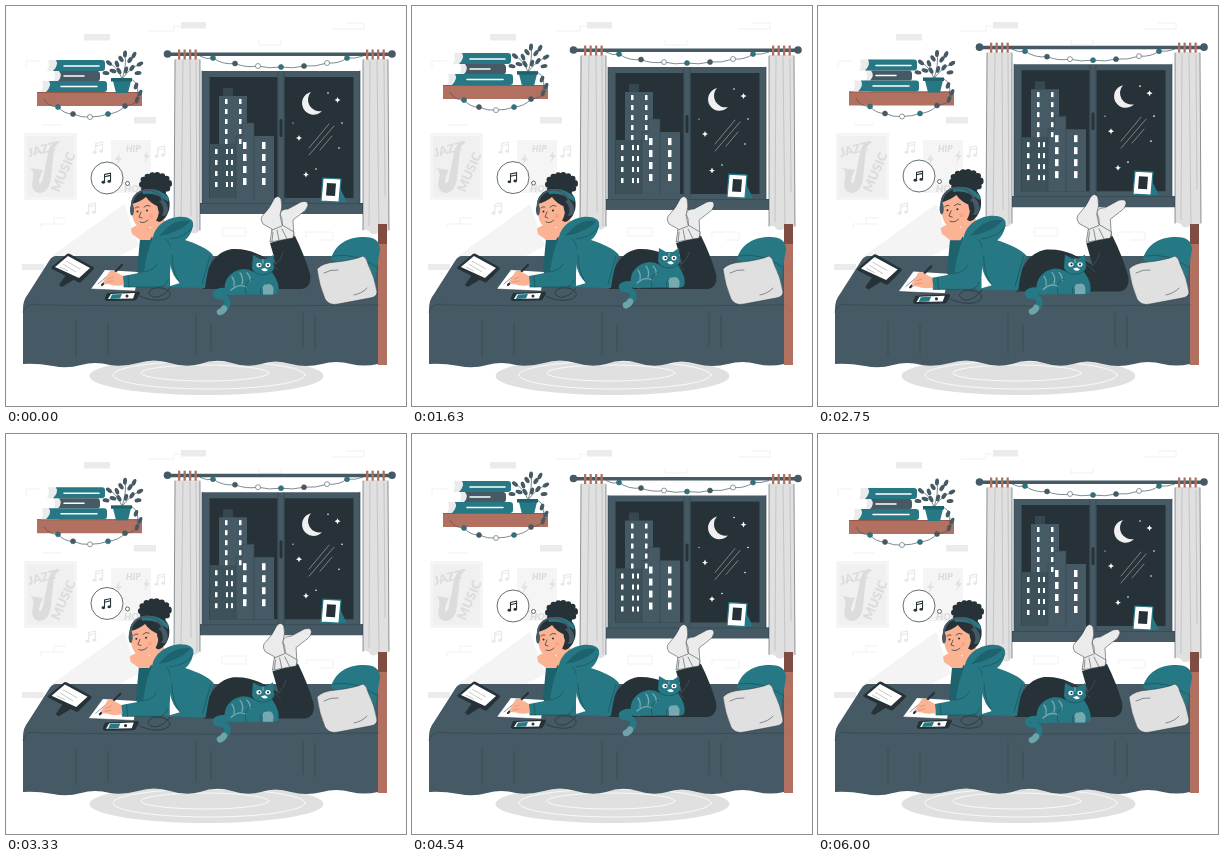
Animation, 400 px wide and 400 px high, one loop 6.04 s. Source, as an HTML page:

```html
<!DOCTYPE html>
<html lang="en">
<head>
<meta charset="utf-8">
<title>Evening with music</title>
<style>
  html, body { margin: 0; width: 100%; height: 100%; overflow: hidden; background: #fff; }
  svg { display: block; width: 100vw; height: 100vh; }
  text { font-family: Lato, sans-serif; font-weight: 900; fill: #dcdcdc; }
  .slate { fill: #455a64; } .dark { fill: #263238; } .teal { fill: #267884; }
  .deep { fill: #1d626d; } .brown { fill: #b27060; } .skin { fill: #fcb394; }
  .white { fill: #fff; } .grey { fill: #e0e0e0; } .pale { fill: #ebebeb; }
  .line { fill: none; stroke: #263238; stroke-width: .7; stroke-linecap: round; stroke-linejoin: round; }
  .soft { stroke: #164d56; stroke-width: .6; }
  .wire { fill: none; stroke: #455a64; stroke-width: .7; }
  .thin { fill: none; stroke: #fff; stroke-width: .8; stroke-linecap: round; }
  .faint { fill: none; stroke: #eee; stroke-width: .8; }
</style>
</head>
<body>
<svg viewBox="0 0 400 400">
  <defs>
    <g id="notes">
      <ellipse cx="-3.500" cy="4.200" rx="2" ry="1.600"/><ellipse cx="3" cy="3.200" rx="2" ry="1.600"/>
      <path d="M-2.200 4V-4.500L4.500-6V3M-2.200-2L4.500-3.500" fill="none" stroke="currentColor" stroke-width="1.200"/>
    </g>
    <path id="star" d="M0-3Q.3-.3 3 0Q.3 .3 0 3Q-.3 .3-3 0Q-.3-.3 0-3"/>
    <path id="bolt" d="M2-6L-3 1H0L-2 7L4-1H1Z"/>
  </defs>

  <!-- wall -->
  <path class="pale" d="M78 28h26v6.500h-26zM175 16h25v6.500h-25zM128 111h22v6.500h-22zM16 258h22v6h-22z"/>
  <path class="faint" d="M143 25h25v-5h9M326 23h32M340 17h18v6M253 34v5h22v-5M20 62v-7h15M35 222v-4h24M48 218v-6h12M216 230v-8h24v8zM300 231v-5h25M313 234h14v-8M110 50h18M36 119h20"/>
  <path d="M18 127h53v67h-53z" fill="#f5f5f5"/>
  <path d="M21 130h47v61h-47z" fill="#f0f0f0"/>
  <path d="M46 138Q50 133 54 136Q49 139 48 144L45 172Q43 187 33 187Q24 185 27 173Q29 165 24 162L37 164Q33 171 33 177Q36 178 37 172L42 147Q43 141 46 138Z" fill="#dcdcdc"/>
  <text transform="translate(23 151) rotate(-14)" font-size="12">JAZZ</text>
  <text transform="translate(53 187) rotate(-66)" font-size="13">MUSIC</text>
  <path d="M105 134h40v53h-40z" fill="#f5f5f5"/>
  <g style="fill:#e2e2e2">
    <text x="120" y="146" font-size="9" font-style="italic">HIP</text>
    <text x="118" y="186" font-size="10" font-style="italic">HOP</text>
    <use href="#bolt" x="112" y="153"/><use href="#bolt" x="140" y="150"/>
  </g>
  <g fill="#e8e8e8" color="#e8e8e8">
    <use href="#notes" x="92" y="142"/><use href="#notes" x="85" y="203"/><use href="#notes" x="154" y="146"/>
  </g>
  <path d="M46 250L118 198L133 240L88 263Z" fill="#f4f4f4"/>

  <g id="bubble">
    <g class="white" stroke="#263238" stroke-width=".7">
      <circle cx="101" cy="172" r="16"/><circle cx="121.500" cy="177.500" r="2"/>
    </g>
    <g class="dark" color="#263238"><use href="#notes" transform="translate(100.500 172.500) scale(.9)"/></g>
  </g>

  <g id="shelf">
    <path class="brown" d="M31 86h105v14h-105z"/>
    <path d="M31 86h105v1h-105z" fill="#95594a"/>
    <path class="pale" d="M36 75h17v11h-18q3-5 1-11zM48 65h14v10h-14q2-5 0-10zM42 54h15v11h-16q3-5 1-11z"/>
    <path class="teal" d="M43 75H98Q101 75 101 78V83Q101 86 98 86H40Q46 80 43 75M50 54H96Q99 54 99 57V62Q99 65 96 65H47Q53 59 50 54"/>
    <path class="slate" d="M53 65H92Q94 66 94 68V72Q94 75 92 75H52Q57 70 53 65"/>
    <path class="thin" d="M55 80.500h36M58 60h35M58 70h20" style="stroke-width:1.500"/>
    <path class="line" d="M116 73Q112 61 103 57M116 73Q121 59 119 48M116 73Q124 62 134 58M121 73Q133 71 132 91" style="stroke:#455a64"/>
    <g class="slate" id="leaves"></g>
    <path class="teal" d="M107 75H125L122 87H110Z"/><path class="deep" d="M105 72h21v3.500h-21z"/>
    <path class="wire" d="M38 93Q42 101 52 101Q58 108 67 108Q76 112 84 111Q94 111 102 108Q113 107 119 100Q130 99 134 91"/>
    <g id="shelfLights"></g>
  </g>

  <g id="window">
    <path class="slate" d="M196 65h158v132h-158zM193 197h164v11h-164z"/>
    <path class="line" d="M193 197.500h164M196 65v132M354 65v132" style="stroke:#37474f"/>
    <path class="dark" d="M203.500 71h68v121h-68zM278.500 71h69v121h-69z"/>
    <path d="M217 82h10v8h-10zM204 138h26v54h-26z" fill="#37474f"/>
    <path class="slate" d="M213 90h28v102h-28zM230 130h6v-13h12v13h20v62h-38z"/>
    <path d="M204 138h26v54h-26z" fill="#3d515b"/>
    <path d="M230 192V130h6V117h12v13V192" class="line" style="stroke:#37474f"/>
    <g class="white" id="panes"></g>
    <path class="line" d="M272 66v130M278 66v130" style="stroke:#37474f"/>
    <rect class="dark" x="273.500" y="113" width="3" height="18" rx="1.500"/>
    <path d="M305 86A11.500 11.500 0 1 0 316 105A11.500 11.500 0 0 1 305 86" fill="#f0f0f0"/>
    <g class="white">
      <use href="#star" x="331.500" y="94"/><use href="#star" x="293" y="132"/><use href="#star" x="300" y="168.500"/>
      <circle cx="322" cy="87" r=".8"/><circle cx="336" cy="117" r=".8"/><circle cx="310" cy="163" r=".8"/><circle cx="333" cy="142" r=".8"/><circle cx="287" cy="117" r=".6"/>
    </g>
    <path d="M303 142L323 118M303 149L328 120M314 144L326 130" class="thin" stroke-opacity=".65" style="stroke-width:.6"/>
    <path class="teal" d="M333 180L341 196H331Z"/>
    <path class="white" stroke="#267884" stroke-width="1.200" d="M317 172L335 173L333 196L315 195Z"/>
    <path class="dark" d="M321 177L330 177.500L329 190L320 189.500Z"/>
    <path class="grey" d="M169 53H194V224Q189 230 185 226Q179 222 176 226Q171 229 168 225Z"/>
    <path class="grey" d="M357 53H382L383 224Q378 230 373 226Q366 231 363 225Q359 223 357 224Z"/>
    <path class="line" d="M177 55L175 220M184 55L185 210M190 55L191 224M364 55L363 220M371 55L373 225M378 56L379 190" style="stroke:#a8a8a8;stroke-width:.5"/>
    <path class="line" d="M169 54L168 225M194 54V224M357 54V224M382 54L383 224" style="stroke-width:.5"/>
    <path class="slate" d="M162 46.500h225v3.500h-225z"/>
    <circle class="slate" cx="161.500" cy="48" r="3.800"/><circle class="slate" cx="386" cy="48" r="3.800"/>
    <g class="brown" id="rings"></g>
    <path class="wire" d="M194 50Q201 54 207 52Q217 59 229 57.500Q240 62 252 60Q263 63 275 61Q287 63 298 60Q310 61 321 57Q333 58 341 52Q349 53 357 50"/>
    <g id="windowLights"></g>
  </g>

  <!-- rug and bed -->
  <ellipse class="grey" cx="200.500" cy="370" rx="117" ry="19"/>
  <ellipse class="thin" cx="203" cy="369" rx="96" ry="14"/><ellipse class="thin" cx="199" cy="367" rx="64" ry="8"/>
  <path class="brown" d="M372 218h9v141h-9z"/><path d="M372 218h9v20h-9z" fill="#7f4d42"/>
  <path class="slate" d="M50 250H372V358Q358 361 345 358Q330 354 316 358Q300 362 285 358Q269 353 255 358Q241 362 226 357Q210 352 194 358Q180 362 164 357Q148 352 132 357Q117 361 104 359Q89 355 75 359Q61 363 47 360Q30 357 17 358V303Q17 294 22 288L43 255Q46 250 50 250Z"/>
  <path class="line" d="M34 299Q200 301 372 299M70 315V350M102 318V348M190 308V348M205 318V345M297 307V340M309 309V343M17 306Q20 295 34 299" style="stroke:#37474f"/>
  <path class="teal" d="M325 253C329 238 342 231 358 231C369 231 374 235 374 244Q371 259 369 275L342 270Z"/>
  <path class="line soft" d="M327 250Q350 246 372 262"/>
  <path class="grey" stroke="#263238" stroke-width=".5" d="M311 263Q316 257 330 256Q348 254 357 250Q361 252 362 258Q369 272 371 286Q371 291 364 292Q348 295 332 298Q323 300 319 293Q313 279 311 263Z"/>
  <path class="line" d="M318 267Q325 263 332 264M361 282Q357 287 348 289" style="stroke-width:.5"/>

  <g id="girl">
    <!-- tablet, notebook, phone -->
    <path class="dark" d="M62 266L53 279L56 281L69 273L82 270L76 262Z"/>
    <path class="dark" d="M45 261.500L61 248Q62 247 64 248L87 261Q89 262 87 264L75 276Q74 277 72 276L46 263Z"/>
    <path class="white" d="M49 261L62 250L84 262L73 272Z"/>
    <path d="M60 255L74 263M57 258L70 266M54 261L62 265" stroke="#bbb" stroke-width=".8" fill="none"/>
    <path class="white" d="M85 283L99 264L132 266L129 285Z"/><path class="line" d="M85 283L129 285M92 278L106 266" style="stroke-width:.5"/>
    <path class="line" d="M134 290C147 297 166 295 164 287C161 280 143 280 143 287C146 294 157 292 164 282"/>
    <path class="dark" d="M101 287L133 285.500Q135 287 133 289L131 293Q130 294.500 128 294.500L101 295Q98 294 99 292Z"/>
    <path class="white" d="M105 288L129 287L127 292.500L102 293Z"/><path class="teal" d="M106 288.500L116 288L114 292.500L104 293Z"/><circle class="dark" cx="121" cy="290" r="1.500"/>

    <!-- legs -->
    <path class="pale" stroke="#263238" stroke-width=".5" d="M277 228L276 213L274 208Q275 203 282 203L295 196Q302 194 302 199Q301 204 296 207L287 214L288 231"/>
    <path class="dark" d="M264 237L289 230Q298 248 304 268Q306 281 296 283L197 283C200 262 208 246 226 243C244 242 255 249 270 258Z"/>
    <path class="pale" stroke="#263238" stroke-width=".5" d="M264 236L266 223L257 218Q253 212 258 208Q264 202 268 193Q272 188 275 193Q277 201 274 209L276 219L288 226L287 232Z"/>
    <path class="line" d="M266 224L276 220M267 226L266 235M271 224L273 234M276 223L281 233" style="stroke-width:.5"/>
    <path class="line" d="M269 259Q275 254 277 246M272 264Q262 254 249 249" style="stroke:#506570;stroke-width:.5"/>

    <!-- body -->
    <path class="deep" d="M134 233L148 230L153 268L131 266Z"/>
    <path class="skin" d="M125 223Q130 218 139 219L149 225L144 234L134 234Q129 230 126 228Z"/>
    <path class="skin" d="M143 214L155 208L163 223L147 234Z"/>
    <path class="teal" d="M147 231C149 221 158 213 171 211C181 210 188 213 187 219C186 226 183 231 179 234C191 238 201 242 207 249Q202 260 199 282L160 281L141 267Q139 250 147 231Z"/>
    <path class="white" d="M164 257Q166 270 174 277L164 280Z"/>
    <path class="deep" d="M162 221Q172 213 184 215Q180 221 170 225Q162 229 153 230Z"/>
    <path class="line soft" d="M160 233Q165 236 164 244M187 220Q181 231 164 233M166 249Q166 266 174 277M196 278L204 250"/>
    <path class="teal" d="M148 230Q158 231 164 240Q167 257 162 275Q160 281 151 281L118 281Q115 276 117 270L138 266Q140 247 148 230Z"/>
    <path class="line soft" d="M138 266Q149 264 151 258M118 281L151 281Q159 282 162 274M122 270L123 281"/>
    <path d="M96 279L116 259" stroke="#263238" stroke-width="2.200" stroke-linecap="round"/>
    <path class="skin" d="M117 270L108 265Q104 263 102 268L97 276Q98 279 102 278Q109 281 118 279Z"/>
    <path class="line" d="M102 273L107 271M101 276L107 275" style="stroke:#c67b65;stroke-width:.5"/>

    <!-- head -->
    <ellipse class="dark" cx="149.500" cy="178" rx="14" ry="9"/>
    <ellipse cx="149.500" cy="178" rx="13.500" ry="9" fill="none" stroke="#263238" stroke-width="6" stroke-linecap="round" stroke-dasharray="0 5"/>
    <path class="dark" d="M125 202C124 191 131 184 143 182C158 181 166 190 163 204Q160 214 153 216Z"/>
    <path class="skin" d="M126 198C125 211 128 221 137 223C147 223 154 212 153 201Q144 197 140 191Q134 196 126 198Z"/>
    <path class="teal" d="M136 184Q152 180 163 192L162 196Q151 186 137 188Z"/>
    <path class="line" d="M129 202Q131 200 133 201M138 201Q141 198 144 200M135 206L133 211L136 212M134 216Q138 218 142 214"/>
    <circle class="dark" cx="131.500" cy="205.500" r="1"/><circle class="dark" cx="141" cy="204.500" r="1"/>
    <circle cx="145" cy="210" r="2.200" fill="#f08975" fill-opacity=".35"/>
    <path d="M126 201C124 182 153 176 158 198" fill="none" stroke="#455a64" stroke-width="2"/>
    <ellipse class="slate" cx="126" cy="204" rx="2" ry="5.500"/>
    <ellipse class="slate" cx="157" cy="202" rx="5" ry="8" transform="rotate(-12 157 202)"/>
    <ellipse class="dark" cx="154.500" cy="202.500" rx="2.600" ry="6.500" transform="rotate(-12 154.500 202.500)"/>
  </g>

  <g id="cat">
    <path d="M227 286C211 283 207 288 212 290C222 290 226 299 214 306" fill="none" stroke="#267884" stroke-width="6.500" stroke-linecap="round"/>
    <path d="M218 302.500Q217 305 214 306" fill="none" stroke="#6fa3aa" stroke-width="6.500" stroke-linecap="round"/>
    <path class="teal" d="M219 286C217 273 225 265 237 263Q243 263 248 266L266 266Q275 279 272 287Q268 290 254 288.500L222 289Z"/>
    <path class="teal" d="M246 262L247 249L254 253L261 253L267 249L268 262C267 270 248 271 246 262Z"/>
    <path d="M257 284Q254 278 264 278Q269 280 267 288.500H257Z" fill="#78a9b0"/>
    <path d="M226 271Q229 275 228 280M234 267Q238 272 236 278M241 267Q245 271 244 275M225 284Q233 277 240 281M257 254V257" fill="none" stroke="#78a9b0" stroke-width="1.300" stroke-linecap="round"/>
    <path class="line soft" d="M240 288Q237 276 246 273M248 266Q256 272 266 266M255 288Q253 283 257 280"/>
    <ellipse class="white" cx="253" cy="259" rx="2.600" ry="2.300"/><ellipse class="white" cx="262" cy="259" rx="2.600" ry="2.300"/>
    <circle class="dark" cx="253.500" cy="259" r="1.100"/><circle class="dark" cx="262" cy="259" r="1.100"/>
    <path class="white" d="M255 263L259 262L262 264Q258 267 255 263Z"/>
  </g>
</svg>
<script>
  const LOOP = 6040;
  const el = id => document.getElementById(id);
  const fill = (id, items, draw) => el(id).innerHTML = items.map(draw).join("");

  const bead = ([x, y, color]) =>
    `<circle cx="${x}" cy="${y}" r="2.500" fill="${color}" stroke="#455a64" stroke-width=".6"/>`;
  const T = "#267884", S = "#455a64", W = "#fff";
  fill("shelfLights", [[52, 101, T], [67, 108, S], [84, 111, W], [102, 108, T], [119, 100, S]], bead);
  fill("windowLights", [[207, 52, T], [229, 57.5, S], [252, 60, W], [275, 61, T], [298, 60, S], [321, 57, W], [341, 52, T]], bead);
  fill("rings", [172, 177.5, 183, 188.5, 360, 365.5, 371, 376.5], x => `<path d="M${x} 43.500h2.300v10h-2.300z"/>`);

  // x, y, lean
  fill("leaves", [
    [103, 57, -50], [107, 65, -75], [111, 58, -20], [119, 48, 5], [115, 53, -35], [124, 54, 35], [113, 65, -30],
    [128, 49, 25], [134, 58, 60], [126, 62, 35], [120, 64, 15], [132, 67, 80], [100, 67, -80], [130, 80, 20], [134, 87, 25], [131, 94, 15]
  ], ([x, y, a]) => `<ellipse cx="${x}" cy="${y}" rx="2" ry="3.500" transform="rotate(${a} ${x} ${y})"/>`);

  // x, y, columns, rows, column gap, row gap, width, height
  fill("panes", [
    [219, 93, 2, 5, 14, 10, 2.5, 5], [209, 143, 1, 4, 0, 11, 2.5, 5], [220, 143, 2, 4, 5, 11, 2, 5],
    [237, 136, 2, 4, 19, 12, 3.5, 7]
  ], ([x, y, cols, rows, dx, dy, w, h]) =>
    Array.from({ length: cols * rows }, (_, i) =>
      `<rect x="${x + i % cols * dx}" y="${y + Math.floor(i / cols) * dy}" width="${w}" height="${h}"/>`).join(""));

  const float = (id, p, cycles) =>
    el(id).setAttribute("transform", `translate(0 ${-3.5 * (1 - Math.cos(2 * Math.PI * cycles * p))})`);

  // Two swells at 14% and 42% of the loop, then rest.
  const stops = [[0, 0], [.14, 1], [.28, 0], [.42, 1], [.7, 0], [1, 0]];
  function beat(p) {
    const i = stops.findIndex(s => s[0] > p);
    const [a, from] = stops[i - 1], [b, to] = stops[i];
    const u = (p - a) / (b - a);
    return from + (to - from) * u * u * (3 - 2 * u);
  }

  const start = performance.now();
  function frame() {
    const p = (performance.now() - start) % LOOP / LOOP;
    float("window", p, 1);
    float("shelf", p, 2);
    float("cat", p, 2);
    float("bubble", p, 4);
    el("girl").setAttribute("transform", `translate(174.5 231) scale(${1 + .05 * beat(p)}) translate(-174.5 -231)`);
    requestAnimationFrame(frame);
  }
  frame();
</script>
</body>
</html>
```
